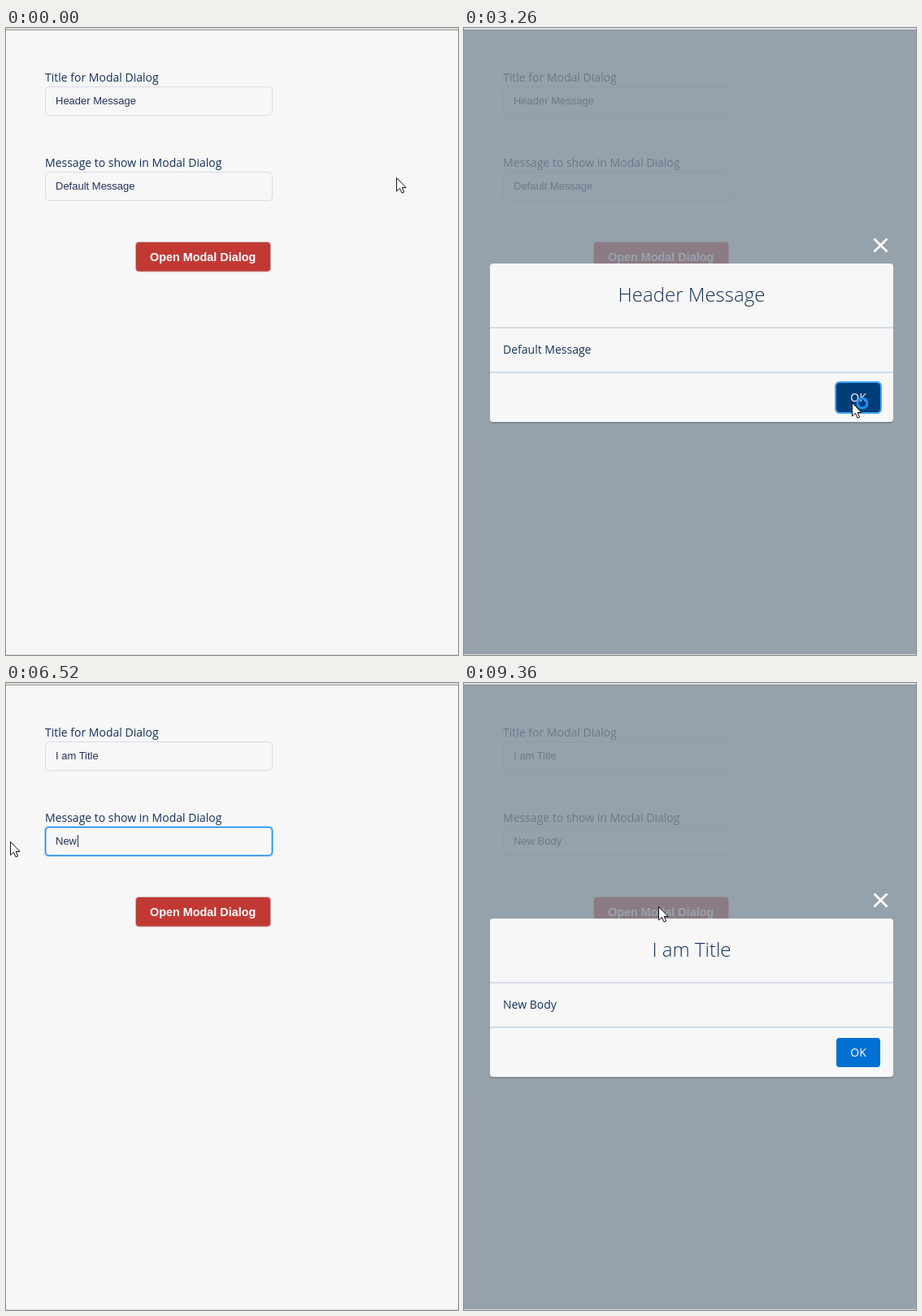
Recreate the animation shown at these times as an HTML page. Size 556 by 772 pixels, loop 9560 ms.

```html
<!DOCTYPE html>
<html lang="en">
<head>
<meta charset="utf-8">
<title>Modal dialog demo</title>
<style>
  html, body { margin: 0; width: 100%; height: 100%; overflow: hidden; background: #f7f7f7; }
  svg { display: block; width: 556px; height: 772px; }
  text { font: 14px "Open Sans", "Noto Sans", sans-serif; fill: #16325c; white-space: pre; }
  .field { font: 13px "Liberation Sans", Arial, sans-serif; fill: #26305c; }
  .bold { font: bold 14.4px "Liberation Sans", Arial, sans-serif; fill: #fff; }
  .head { font-size: 24px; font-weight: 300; text-anchor: middle; }
  .ring rect { fill: none; stroke: #1589ee; }
</style>
</head>
<body>
<svg viewBox="0 0 556 772">
  <rect width="556" height="772" fill="#f7f7f7"/>
  <rect width="556" height="2" fill="#dcdcdc"/>
  <rect y="2" width="556" height="1" fill="#a0a0a0"/>
  <rect y="771" width="556" height="1" fill="#dadada"/>

  <text x="48" y="66">Title for Modal Dialog</text>
  <text x="48" y="171">Message to show in Modal Dialog</text>
  <g id="fields"></g>

  <rect id="btnGlow" x="158.5" y="262" width="168" height="38.5" rx="5" fill="none" stroke="#4a9be0" stroke-opacity=".55" stroke-width="2"/>
  <rect id="btn" x="159.5" y="263.5" width="166" height="36.5" rx="4" stroke="#c9b3b2"/>
  <text class="bold" x="177" y="286.5">Open Modal Dialog</text>

  <g id="modal">
    <rect y="2" width="556" height="769" fill="#7e8c99" fill-opacity=".8"/>
    <path d="M504.500 259.500l16 16m0-16l-16 16" stroke="#fff" stroke-width="2.8"/>
    <rect x="32" y="292" width="496" height="195" rx="4" fill="#000" opacity=".14"/>
    <rect x="32" y="290" width="496" height="195" rx="4" fill="#f7f7f7"/>
    <rect x="32" y="368" width="496" height="2" fill="#d8dde6"/>
    <rect x="32" y="423" width="496" height="2" fill="#c6dfec"/>
    <text id="head" class="head" x="280" y="337"></text>
    <text id="body" x="48" y="401"></text>
    <rect id="okGlow" x="457" y="436" width="56" height="38" rx="5" fill="none" stroke="#3fa5f5" stroke-width="2"/>
    <rect id="ok" x="458" y="437" width="54" height="36" rx="4"/>
    <text x="485" y="460" text-anchor="middle" style="fill:#fff">OK</text>
  </g>

  <g id="cursor" stroke-linejoin="round">
    <path id="arrow" d="M.5.5V17l4-3.600 2.500 5.800 2.600-1.100L7.200 12.500H12z" fill="#fff" stroke="#111"/>
    <circle id="busy" cx="13" cy="1" r="6" fill="none" stroke="#1b8ff0" stroke-width="3"/>
    <path id="hand" d="M-1.500 13V2Q-1.500.5 0 .5T1.500 2V7.500Q1.500 6 3 6T4.500 8Q4.500 6.800 5.800 6.800T7.200 8.800Q9.500 7.500 9.500 10V15Q9.500 18 7.500 20V22.500H-2V20.500L-7 13.500Q-7.600 11.500-6 11-4.500 10.700-1.500 14M1.500 7.500V11M4.500 8V11.500M7.200 8.800V12" fill="#fff" stroke="#111"/>
    <path id="beam" d="M-3.500-7.500H-1Q0-7.500 0-6.500 0-7.500 1-7.500H3.500M0-7V7M-3.500 7.500H-1Q0 7.500 0 6.500 0 7.500 1 7.500H3.500" fill="none" stroke="#111" stroke-width="1.200"/>
  </g>
</svg>
<script>
const LOOP = 9560;
const $ = id => document.getElementById(id);
const set = (id, name, value) => $(id).setAttribute(name, value);
const show = (id, on) => set(id, 'opacity', +on);
const ramp = (t, start, end) => Math.min(1, Math.max(0, (t - start) / (end - start)));
const within = (t, a, b) => t >= a && t < b;

$('fields').innerHTML = ['title', 'note'].map((id, i) => `
  <g transform="translate(48 ${72 + 105 * i})">
    <rect x=".5" y=".5" width="279" height="35" rx="4" fill="#f7f7f7" stroke="#d8dde6"/>
    <g class="ring" id="${id}Ring">
      <rect x=".5" y=".5" width="279" height="35" rx="4" stroke-width="3" stroke-opacity=".35"/>
      <rect x=".5" y=".5" width="279" height="35" rx="4"/>
    </g>
    <rect id="${id}Sel" y="10" height="15" fill="#fbedb5"/>
    <text class="field" id="${id}Text" x="13" y="22"></text>
    <rect id="${id}Caret" y="10" width="1" height="15" fill="#16325c"/>
  </g>`).join('');

// Pointer hot spot: time, x, y
const path = [
  [0, 480, 184], [730, 480, 184], [850, 491, 175], [1060, 400, 222], [1320, 262, 289],
  [1960, 262, 289], [2100, 288, 274], [2420, 400, 365], [2730, 477, 461],
  [3320, 477, 461], [3700, 330, 270], [4090, 170, 91], [4260, 38, 90],
  [4560, 38, 90], [4860, 294, 189], [4930, 300, 190], [5280, 150, 197], [5490, 20, 203],
  [5640, 5, 196], [5800, 5, 196], [5801, 5, 195],
  [8490, 5, 195], [8800, 120, 240], [9090, 239, 275], [LOOP, 239, 275]
];
// Moments at which each letter of the second field appears
const message = 'New Body';
const keys = [6230, 6290, 6520, 6650, 6910, 7170, 7630, 7730];

function pointer(t) {
  const i = path.findIndex(p => p[0] > t);
  const [t0, x0, y0] = path[i - 1], [t1, x1, y1] = path[i];
  const k = (t - t0) / (t1 - t0);
  return [x0 + (x1 - x0) * k, y0 + (y1 - y0) * k];
}

function select(id, x, on) {
  const left = Math.max(13, Math.min(112, x - 48));
  set(id + 'Sel', 'x', left);
  set(id + 'Sel', 'width', on ? 112 - left : 0);
}

function draw(t) {
  const [x, y] = pointer(t);
  const over = (l, top, r, b) => x >= l && x < r && y >= top && y < b;
  const later = t >= 5520;

  // Fields
  $('titleText').textContent = later ? 'I am Title' : 'Header Message';
  set('titleRing', 'opacity', ramp(t, 4110, 4210) - ramp(t, 5510, 5610));
  select('title', t < 4260 ? x : 0, within(t, 4110, 5520));
  show('titleCaret', false);

  const typed = keys.filter(k => k <= t).length;
  $('noteText').textContent = typed ? message.slice(0, typed) : 'Default Message';
  set('noteRing', 'opacity', ramp(t, 5510, 5610) - ramp(t, 9180, 9280));
  select('note', 0, within(t, 5520, keys[0]));
  const idle = t - keys[typed - 1];
  show('noteCaret', typed && t < 9180 && idle % 920 < 460);
  if (typed) set('noteCaret', 'x', Math.round(13.5 + $('noteText').getComputedTextLength()));

  // Dialog
  const open = ramp(t, 1635, 1700) - ramp(t, 3290, 3380) + ramp(t, 9295, 9360);
  set('modal', 'opacity', open);
  $('head').textContent = later ? 'I am Title' : 'Header Message';
  $('body').textContent = later ? message : 'Default Message';
  const onOk = open > 0 && over(458, 437, 512, 473);
  const okDown = within(t, 3230, 3400);
  set('ok', 'fill', okDown ? '#003e7a' : onOk ? '#005fb2' : '#0070d2');
  show('okGlow', okDown);

  // Main button
  const onBtn = !open && over(159, 263, 326, 300);
  const down = within(t, 1480, 1640) || within(t, 9180, 9295);
  set('btn', 'fill', down ? '#870500' : onBtn ? '#a61a14' : '#c23934');
  show('btnGlow', down);

  // Pointer
  const busy = within(t, 3230, 3400);
  const dragging = within(t, 4110, 4560) || within(t, 5280, 5800);
  const onField = !open && (over(48, 72, 328, 108) || over(48, 177, 328, 213));
  const kind = busy ? 'arrow' : dragging || onField ? 'beam'
    : onBtn || onOk || within(t, 1635, 1960) ? 'hand' : 'arrow';
  for (const k of ['arrow', 'hand', 'beam']) show(k, k === kind);
  show('busy', busy);
  set('cursor', 'transform', `translate(${Math.round(x)} ${Math.round(y)})`);
}

const start = performance.now();
function tick() {
  draw((performance.now() - start) % LOOP);
  requestAnimationFrame(tick);
}
tick();
</script>
</body>
</html>
```
